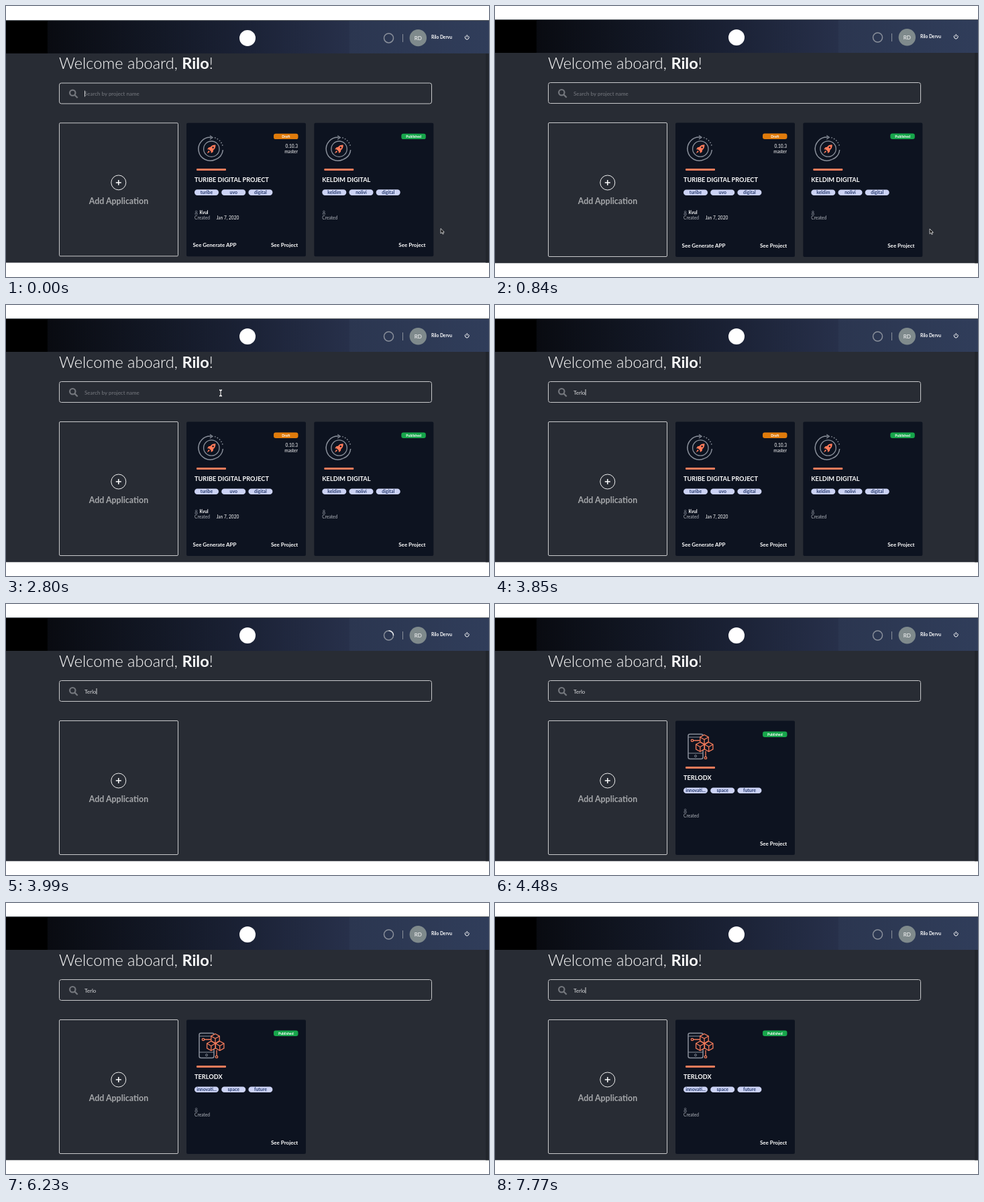
Write an HTML page that moves like this. It is 720 by 405 pixels and loops after 8000 ms.

```html
<!DOCTYPE html>
<html lang="en">
<head>
<meta charset="utf-8">
<title>Project dashboard</title>
<style>
  html, body { margin: 0; width: 100%; height: 100%; overflow: hidden; background: #fff; }
  svg { display: block; width: 720px; height: 405px; font-family: Lato, sans-serif; fill: #fff; }
  .line { fill: none; stroke: #8a909b; stroke-width: 1.5; }
  .frame { fill: none; stroke: #c9cacc; }
  .accent { stroke: #f67c5b; stroke-width: 1.3; }
  .small { font-size: 6.6px; }
  .muted { fill: #b4b8bf; }
  .bold { font-weight: 700; }
  .end { text-anchor: end; }
  .mid { text-anchor: middle; }
</style>
</head>
<body>
<svg viewBox="0 0 720 405">
  <defs>
    <linearGradient id="sky">
      <stop offset=".085" stop-color="#000"/>
      <stop offset=".087" stop-color="#090b11"/>
      <stop offset=".3" stop-color="#121724"/>
      <stop offset=".5" stop-color="#1b2236"/>
      <stop offset=".71" stop-color="#27304a"/>
      <stop offset=".712" stop-color="#2b3650"/>
      <stop offset="1" stop-color="#303d5a"/>
    </linearGradient>
    <g id="rocket">
      <path class="line" d="M312 229.4A17.5 17.5 0 1 1 306 196.2"/>
      <path class="line" d="M304 193.6l4 2.6-4 2.8" style="stroke-width:1.2"/>
      <path class="line" d="M311 196.6A17.5 17.5 0 0 1 323.4 211" stroke-dasharray="1.6 2.4"/>
      <path class="line" d="M323.4 215A17.5 17.5 0 0 1 312 229.4"/>
      <circle class="line" cx="306.3" cy="213.5" r="11.7" style="stroke-width:1.3"/>
      <path fill="#ff7a59" d="M312.4 207.3q-5.6 0-7.7 3.4l-2.7.6-2 2.9 2.8.2 2.7 2.7.3 2.9 2.8-2.1.5-2.7q3.5-2.4 3.3-7.9zM302 216l-2.3 4.2 4.2-2.4z"/>
      <circle cx="308.6" cy="211.3" r="1.2" fill="#0d1320"/>
    </g>
    <g id="blocks">
      <rect class="line" x="288" y="194.5" width="22" height="37" rx="2.5"/>
      <path class="line" d="M288 199h22M288 223h22" style="stroke-width:1"/>
      <circle class="line" cx="299" cy="227.3" r="1.5" style="stroke-width:1"/>
      <g id="cubes"></g>
      <path class="line accent" d="M296 204h9M314 228v-8"/>
      <circle class="line accent" cx="294" cy="204" r="1.7"/>
      <circle class="line accent" cx="314" cy="230" r="1.7"/>
    </g>
  </defs>

  <g id="screen">
    <rect y="20" width="720" height="364.3" fill="#282c34"/>
    <rect x="715" y="70" width="5" height="314.3" fill="#22262d"/>
    <rect y="21" width="720" height="49" fill="url(#sky)"/>
    <rect y="20" width="720" height="1" fill="#555b60"/>
    <circle cx="360" cy="47" r="12"/>

    <circle class="line" cx="570.5" cy="47" r="7"/>
    <path id="spinner" d="M570.5 40a7 7 0 0 1 7 7" fill="none" stroke="#e8eaee" stroke-width="1.6"/>
    <path class="line" d="M591.5 41v12" style="stroke-width:1"/>
    <circle cx="614.3" cy="46.7" r="12.7" fill="#7f8a8c"/>
    <text class="mid" x="614.3" y="49.7" font-size="8">RD</text>
    <text class="small bold" x="634" y="48">Rilo Dervu</text>
    <path d="M685.5 43.7a2.9 2.9 0 1 0 3.4 0M687.2 42v3.8" fill="none" stroke="#fff"/>

    <text x="79" y="93.5" font-size="23.6" font-weight="300">Welcome aboard, <tspan class="bold">Rilo</tspan>!</text>

    <rect class="frame" x="79.5" y="114.5" width="555" height="31" rx="3"/>
    <g fill="none" stroke="#74777d" stroke-width="2.2">
      <circle cx="99.3" cy="129.2" r="4.2"/>
      <path d="M102.4 132.4l4.3 4.3"/>
    </g>
    <text id="query" x="117" y="133.7" font-size="8"></text>
    <rect id="caret" y="126" width=".8" height="9"/>

    <rect class="frame" x="79.5" y="174.5" width="177" height="200" rx="1.5"/>
    <circle cx="167.8" cy="264" r="11" fill="none" stroke="#eee"/>
    <path d="M163.8 264h8M167.8 260v8" stroke="#fff" stroke-width="1.5"/>
    <text class="mid bold" x="168" y="296.2" font-size="12.4" fill="#a6a8ab">Add Application</text>

    <g id="all"></g>
    <g id="found"></g>

    <path id="arrow" d="M0 0v7.5l1.8-1.6 1.2 2.6 1.3-.6-1.2-2.5h2.3z" fill="#111" stroke="#fff" stroke-width=".7"/>
    <g id="beam" fill="none">
      <path d="M-2-4.5q2 0 2 1.5v6q0 1.500-2 1.500M2-4.500q-2 0-2 1.500v6q0 1.500 2 1.500" stroke="#fff" stroke-width="1.5"/>
      <path d="M0-3v6" stroke="#222" stroke-width=".6"/>
    </g>
  </g>
</svg>
<script>
const $ = id => document.getElementById(id);
const LOOP = 8000, STEP = 70, WORD = 'Terlo';
const KEY_TIMES = [3080, 3220, 3290, 3430, 3500];
const CLEAR = 3990, FOUND = 4340;

function card({ x = 0, icon, title, tags, state, color, version = '', user = '', date = '', generate }) {
  const chips = tags.map((tag, i) => `
    <rect x="${281 + i * 40.2}" y="274.5" width="36" height="8.6" rx="4.2" fill="#ccd3f5"/>
    <text class="mid bold" x="${299 + i * 40.2}" y="281.2" font-size="6.9" fill="#26396b">${tag}</text>`).join('');
  const details = version && `
    <text class="small end" x="435" y="211.5">${version}</text>
    <text class="small end" x="435" y="220">master</text>`;
  return `<g transform="translate(${x})">
    <rect x="269" y="174.5" width="178" height="200.5" rx="2" fill="#0d1320"/>
    <use href="#${icon}"/>
    <rect x="284" y="243" width="44" height="3" rx="1" fill="#f67c5b"/>
    <rect x="399" y="190.5" width="36.5" height="8.4" rx="3.2" fill="${color}"/>
    <text class="mid bold" x="417.3" y="196.6" font-size="5.2">${state}</text>${details}
    <text class="bold" x="281" y="263" font-size="9.2">${title}</text>${chips}
    <path class="line" d="M281.7 311.500q0-2.200 1.900-2.200t1.900 2.200z" style="stroke-width:.7"/>
    <circle class="line" cx="283.6" cy="307.7" r="1.3" style="stroke-width:.7"/>
    <text class="small bold" x="288.5" y="311">${user}</text>
    <text class="small muted" x="281" y="319.3">Created</text>
    <text class="small" x="313.7" y="319.3">${date}</text>
    ${generate ? '<text class="bold" x="278.5" y="360.8" font-size="8">See Generate APP</text>' : ''}
    <text class="bold end" x="435.3" y="360.8" font-size="8">See Project</text>
  </g>`;
}

const published = { state: 'Published', color: '#17a54b' };
$('all').innerHTML = card({
  icon: 'rocket', title: 'TURIBE DIGITAL PROJECT', tags: ['turibe', 'uvo', 'digital'],
  state: 'Draft', color: '#e07b0b', version: '0.10.3', user: 'Kvul', date: 'Jan 7, 2020', generate: true
}) + card({
  x: 190.3, icon: 'rocket', title: 'KELDIM DIGITAL', tags: ['keldim', 'nolivi', 'digital'], ...published
});
$('found').innerHTML = card({
  icon: 'blocks', title: 'TERLODX', tags: ['innovati...', 'space', 'future'], ...published
});
$('cubes').innerHTML = [[312, 202.5], [305.8, 213.5], [318.7, 213.5]].map(([x, y]) =>
  `<path class="line accent" style="fill:#0d1320" d="M${x} ${y - 7}l6.2 3.5v7l-6.2 3.5-6.2-3.5v-7z"/>
   <path class="line accent" d="M${x - 6.2} ${y - 3.5}l6.2 3.5 6.2-3.5M${x} ${y}v7"/>`).join('');

const show = (id, on) => $(id).style.display = on ? '' : 'none';
const place = (id, x, y) => $(id).setAttribute('transform', `translate(${x} ${y})`);

// Eased progress between two times
function ease(t, from, to) {
  const p = Math.min(1, Math.max(0, (t - from) / (to - from)));
  return p * p * (3 - 2 * p);
}

function caretOn(t) {
  if (t < 840) return true;
  if (t < 2870) return false;
  if (t < 4130) return true;
  return t >= 4620 && (t - 4620) % 1040 < 530;
}

function render(t) {
  // The first view sits slightly squeezed
  $('screen').setAttribute('transform', t < 840 ? 'matrix(1 0 0 .995 0 1.2)' : '');

  const typed = WORD.slice(0, KEY_TIMES.filter(k => t >= k).length);
  const query = $('query');
  query.textContent = typed || 'Search by project name';
  query.setAttribute('fill', typed ? '#dcdde0' : '#777a80');
  show('caret', caretOn(t));
  $('caret').setAttribute('x', typed ? 117.3 + query.getComputedTextLength() : 117);

  show('all', t < CLEAR);
  show('found', t >= FOUND);
  show('spinner', t >= CLEAR && t < FOUND);
  $('spinner').setAttribute('transform', `rotate(${(t - CLEAR) * .36} 570.5 47)`);

  const a = ease(t, 840, 1050), b = ease(t, 1820, 2520);
  const x = 648 - 58 * a - 270 * b, y = 333 - 71 * a - 130.5 * b;
  const overInput = y < 146;
  show('arrow', !overInput);
  show('beam', overInput && !typed);
  place('arrow', x, y);
  place('beam', x, y);
}

function tick() {
  render(Math.floor(performance.now() % LOOP / STEP) * STEP);
  requestAnimationFrame(tick);
}
tick();
</script>
</body>
</html>
```
